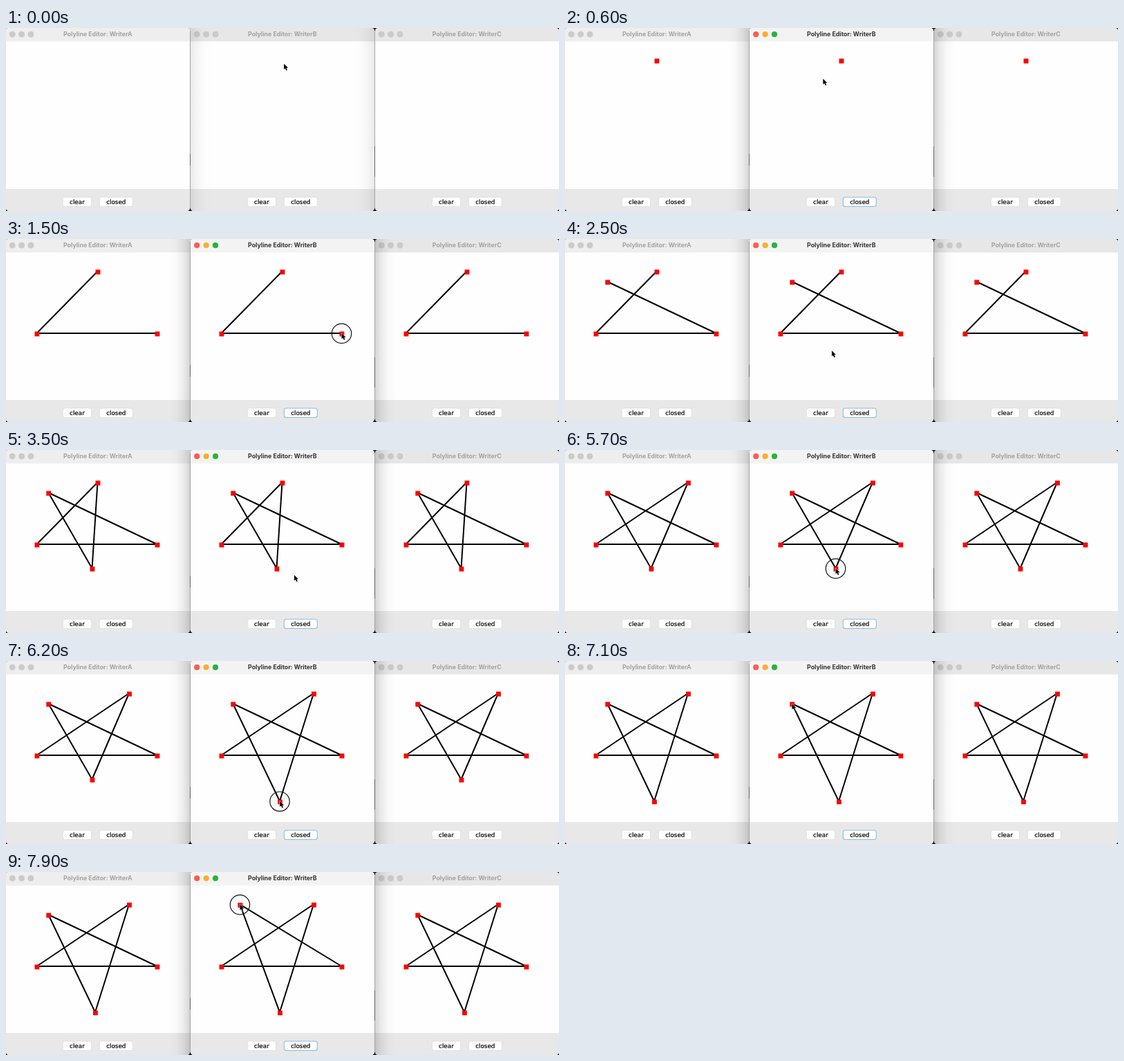
Write an HTML page that moves like this. It is 800 px wide and 266 px high and loops after 8000 ms.

```html
<!DOCTYPE html>
<html lang="en">
<head>
<meta charset="utf-8">
<title>Polyline Editor</title>
<style>
  html, body { margin: 0; width: 100%; height: 100%; overflow: hidden; background: #1c1c1c; }
  svg { display: block; width: 800px; height: 266px; }
  text { text-anchor: middle; }
  .title { font: 700 8.8px Inter, "Open Sans", sans-serif; fill: #a2a2a2; }
  .label { font: 8.8px "DejaVu Sans", sans-serif; fill: #000; stroke: #000; stroke-width: .2; }
  .light { fill: #cccbcb; stroke: #bfbebe; stroke-width: .4; }
  .button { fill: #fff; stroke: #d4d4d4; stroke-width: .6; }
  .edge { fill: none; stroke: #000; stroke-width: 2; stroke-linejoin: round; }
  .active .title { fill: #333; }
  .active .bar { fill: #f4f3f4; }
  .active .light { stroke: none; }
  .active .red { fill: #fb5b53; }
  .active .amber { fill: #f6b02f; }
  .active .green { fill: #28b43c; }
  .active .focus { stroke: #85bdec; stroke-width: 1.1; }
</style>
</head>
<body>
<svg viewBox="0 0 800 266">
  <defs>
    <clipPath id="frame"><rect width="266" height="266" rx="4.5"/></clipPath>
    <linearGradient id="shade">
      <stop offset="0" stop-opacity=".16"/>
      <stop offset=".3" stop-opacity=".075"/>
      <stop offset=".65" stop-opacity=".02"/>
      <stop offset="1" stop-opacity="0"/>
    </linearGradient>
  </defs>
  <rect width="270" height="6" fill="#c9c9c9"/>
  <g id="windows"></g>
  <path d="M266.5 4V262M533.5 4V262" stroke="#a4a4a4"/>
  <path d="M266.5 183V200M533.5 172V216" stroke="#666"/>
  <g id="pointer">
    <circle id="ring" cy=".4" r="14.2" fill="none" stroke="#111" stroke-width="1.2"/>
    <path d="M0 0V9.2L2.1 7.3L3.7 10.9L5.5 10.1L3.9 6.7H6.7Z" transform="scale(.9)"
          stroke="#fff" stroke-width="1.1" paint-order="stroke" stroke-linejoin="round"/>
  </g>
</svg>
<script>
const LOOP = 8000, STEP = 100, PITCH = 267, TAP = 150;
const $ = id => document.getElementById(id);

// All positions are relative to the middle window.
const START = [135, 52], CLOSE_BUTTON = [159, 252];
const star = [[132.5, 47], [44.5, 137], [218.5, 137], [61.3, 62], [124.5, 172]];

const tap = (down, from) => ({ down, up: down + TAP, from, to: from });
const add = (down, i) => ({ ...tap(down, star[i]), vertex: i });
const drag = (down, up, i, to) => ({ down, up, from: star[i], to, vertex: i });

const close = tap(3200, CLOSE_BUTTON);
const gestures = [
  add(400, 0), add(1000, 1), add(1400, 2), add(2100, 3), add(2700, 4),
  close,
  drag(4500, 5400, 0, [178, 47]),
  drag(5700, 6300, 4, [129, 203.8]),
  drag(7200, LOOP, 3, [71.4, 47.2])
];

const clamp = u => Math.min(1, Math.max(0, u));
const easeOut = u => 1 - (1 - u) ** 3;
const smooth = u => u * u * (3 - 2 * u);
const mix = (a, b, u) => a.map((v, i) => v + (b[i] - v) * u);

// Glides to each press, then follows the gesture with a short rest before release.
function pointer(t) {
  let at = START, free = 0;
  for (const { down, up, from, to } of gestures) {
    if (t < down) return mix(at, from, easeOut((t - free) / (down - free)));
    if (t < up) return mix(from, to, smooth(clamp((t - down) / (up - STEP - down))));
    at = to;
    free = up;
  }
  return at;
}

// The edited window follows a drag; the others update on release.
function shape(t, live) {
  const pts = [];
  for (const { down, up, to, vertex } of gestures) {
    if (vertex === undefined || t < down) continue;
    if (t >= up || !pts[vertex]) pts[vertex] = to;
    else if (live) pts[vertex] = pointer(t);
  }
  return pts;
}

const light = (name, i) => `<circle class="light ${name}" cx="${9.2 + i * 13.4}" cy="9.2" r="4.1"/>`;
const button = (x, w, text, cls = "") =>
  `<rect class="button ${cls}" x="${x}" y="246" width="${w}" height="13.5" rx="3"/>
   <text class="label" x="${x + w / 2}" y="255.6">${text}</text>`;
const shade = (flip = "") => `<rect class="shade" width="30" height="266" fill="url(#shade)" ${flip}/>`;

function makeWindow(letter, i) {
  const g = document.createElementNS("http://www.w3.org/2000/svg", "g");
  g.setAttribute("transform", `translate(${i * PITCH} 0)`);
  g.innerHTML = `<g clip-path="url(#frame)">
    <rect width="266" height="266" fill="#fefefe"/>
    <rect class="bar" width="266" height="19.5" fill="${i ? "#e8e7e7" : "#efeeee"}"/>
    <rect y="234" width="266" height="32" fill="#e8e8e8"/>
    ${["red", "amber", "green"].map(light).join("")}
    <text class="title" x="132.8" y="12.2">Polyline Editor: Writer${letter}</text>
    ${button(82.3, 41.2, "clear")}${button(135.3, 48, "closed", "focus")}
    <path class="edge"/><path class="dots" fill="#f80505"/>
    ${shade()}${shade('transform="translate(266 0) scale(-1 1)"')}</g>`;
  $("windows").append(g);
  const [left, right] = g.querySelectorAll(".shade");
  return { g, left, right, edge: g.querySelector(".edge"), dots: g.querySelector(".dots") };
}
const wins = [..."ABC"].map(makeWindow);

function draw(t) {
  const active = t >= gestures[0].down;
  wins.forEach((w, i) => {
    const mid = i === 1, pts = shape(t, mid);
    const shadow = beside => mid ? (active ? 0 : .5) : +(active && i === beside);
    w.g.setAttribute("class", mid && active ? "active" : "");
    w.edge.setAttribute("d", pts.length ? "M" + pts.join("L") + (t >= close.up ? "Z" : "") : "");
    w.dots.setAttribute("d", pts.map(([x, y]) => `M${x - 3} ${y - 2.4}h6.9v6.9h-6.9z`).join(""));
    w.left.setAttribute("opacity", shadow(2));
    w.right.setAttribute("opacity", shadow(0));
  });
  const [x, y] = pointer(t);
  $("pointer").setAttribute("transform", `translate(${x + PITCH} ${y})`);
  $("ring").setAttribute("visibility",
    gestures.some(g => t >= g.down && t < g.up) ? "visible" : "hidden");
}

function tick() {
  draw(Math.floor(performance.now() % LOOP / STEP) * STEP);
  requestAnimationFrame(tick);
}
tick();
</script>
</body>
</html>
```
